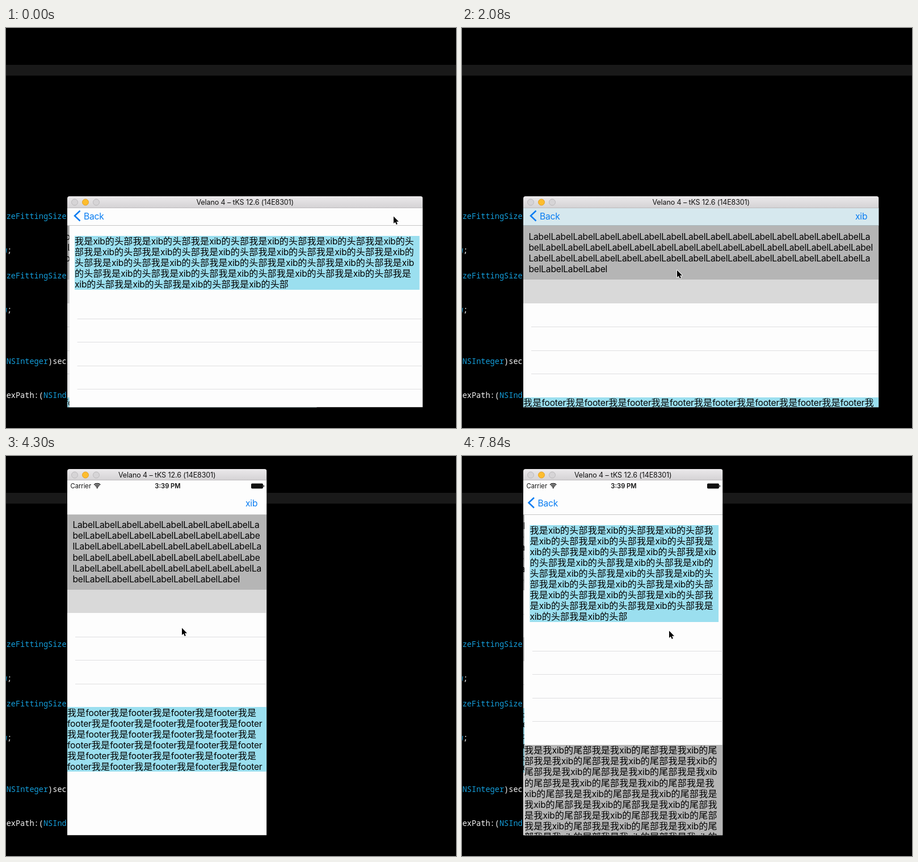
An HTML page with a canvas for the animation above (7990 ms loop, 793x706 px).

```html
<!DOCTYPE html>
<html lang="zh-CN">
<head>
<meta charset="utf-8">
<style>
html, body { margin: 0; width: 100%; height: 100%; overflow: hidden; background: #000; }
canvas { display: block; }
</style>
</head>
<body>
<canvas id="stage" width="793" height="706"></canvas>
<script>
const ctx = document.getElementById('stage').getContext('2d');
const LOOP = 7990, STEP = 148, LAST = 53, TURN = 17;
const LINE = 19.05, ROW = 41.5, PAD = 9.4;
const PAPER = '#fdfdfd', GREY = '#b5b5b5', SKY = '#9bdfef', BLUE = '#087cf2';
const LATIN = 'Inter, sans-serif';
const HAN = '"Noto Sans CJK SC", "Noto Sans CJK JP", "Noto Sans CJK", sans-serif';

// Window box, lower edge of the navigation bar and its items
const wide = { x: 108, y: 297, w: 626.5, h: 372.5, bar: 21, nav: 349, mid: 332, backX: 137, xibX: 693 };
const tall = { x: 108, y: 23, w: 351.5, h: 646.5, bar: 20, nav: 104, mid: 83, backX: 133.5, xibX: 422 };

// Words stay whole, Chinese breaks anywhere
function wrap(unit, width) {
  const out = [''];
  let used = 0;
  for (const part of unit.repeat(27).match(/[a-z]+|./g)) {
    const size = part < '~' ? part.length * 7.2 : 16.15;
    if (used + size > width) {
      out.push('');
      used = 0;
    }
    out[out.length - 1] += part;
    used += size;
  }
  return out;
}

// One endless word is cut at the average letter width
function chop(word, width) {
  const text = word.repeat(50), per = width / 7.84, out = [];
  for (let k = 0; k * per < text.length; k++) {
    out.push(text.slice(Math.floor(k * per), Math.floor((k + 1) * per)));
  }
  return out;
}

for (const lay of [wide, tall]) {
  const inner = lay.w - 2 * PAD;
  lay.label = chop('Label', inner);
  lay.foot = wrap('我是footer', lay.w);
  lay.head = wrap('我是xib的头部', inner);
  lay.tail = wrap('我是我xib的尾部', lay.w);
}

// Pointer stops: step, x, y
const pointer = [
  [0, 683, 332], [6, 570, 490], [11, 150, 333], [14, 379, 427], [21, 379, 427], [22, 392, 423],
  [29, 310, 303], [37, 308, 300], [39, 300, 384], [42, 298, 425], [44, 300, 340], [49, 430, 83], [53, 365, 308]
];
const picks = [0, 1, 3, 4, 2];

const clamp = (v, lo, hi) => Math.min(hi, Math.max(lo, v));
const smooth = (n, from, to) => {
  const p = clamp((n - from) / (to - from), 0, 1);
  return p * p * (3 - 2 * p);
};
const push = k => Math.exp(-1.72 * Math.max(0, k));

function slide(lay, n) {
  return lay.w * (lay === wide ? push(n + 3) + smooth(n, 11, 14) : push(n - 50));
}

function scrolled(lay, n) {
  if (lay === wide) return 122 * smooth(n, 1, 8.25);
  return 70 * Math.sin(Math.PI * clamp((n - 22) / 8, 0, 1)) ** 4;
}

function rect(x, y, w, h, color) {
  const top = Math.round(y);
  ctx.fillStyle = color;
  ctx.fillRect(x, top, w, Math.round(y + h) - top);
}

function disc(x, y, r, color, edge) {
  ctx.beginPath();
  ctx.arc(x, y, r, 0, 7);
  ctx.fillStyle = color;
  ctx.fill();
  ctx.lineWidth = 1;
  ctx.strokeStyle = edge;
  ctx.stroke();
}

function write(str, x, y, font, color, align = 'left', track = 0) {
  ctx.font = font;
  ctx.letterSpacing = track + 'px';
  ctx.textAlign = align;
  ctx.fillStyle = color;
  ctx.fillText(str, x, y);
  return ctx.measureText(str).width;
}

function lines(list, x, y) {
  list.forEach((line, k) => {
    let at = x;
    const base = y + k * LINE + 15.5;
    for (const run of line.match(/[ -~]+|[^ -~]+/g)) {
      at += run < '~'
        ? write(run, at, base, '15.6px ' + LATIN, '#000', 'left', -0.2)
        : write(run, at, base, '16px ' + HAN, '#000', 'left', 0.23);
    }
  });
}

function clipTo(x, y, w, h) {
  ctx.beginPath();
  ctx.rect(x, y, w, h);
  ctx.clip();
}

function rows(lay, x, y, pick) {
  for (let i = 0; i < 5; i++) {
    const end = y + (i + 1) * ROW;
    if (i === pick) rect(x, y + i * ROW, lay.w, ROW, '#d9d9d9');
    else if (i < 4 && i + 1 !== pick) rect(x + 14, end, lay.w - 14, 1, '#dfdfe1');
  }
  return y + 5 * ROW;
}

function codePage(lay, x, scroll, pick) {
  let y = lay.nav - scroll;
  const h = lay.label.length * LINE + 2 * PAD;
  rect(x, lay.nav, lay.w, lay.h, PAPER);
  rect(x, y, lay.w, h, GREY);
  lines(lay.label, x + PAD, y + PAD);
  y = rows(lay, x, y + h, pick);
  rect(x, y, lay.w, lay.foot.length * LINE, SKY);
  lines(lay.foot, x, y);
}

function xibPage(lay, x, scroll) {
  let y = lay.nav + 17.5 - scroll;
  const h = lay.head.length * LINE;
  rect(x, lay.nav, lay.w, lay.h, PAPER);
  rect(x + PAD, y, lay.w - 2 * PAD, h, SKY);
  lines(lay.head, x + PAD, y);
  y = rows(lay, x, y + h + PAD, -1);
  rect(x, y, lay.w, lay.tail.length * LINE, GREY);
  lines(lay.tail, x, y);
  if (scroll > 0) {
    const view = lay.y + lay.h - lay.nav, ratio = view / (view + 122);
    ctx.beginPath();
    ctx.roundRect(x + lay.w - 5, lay.nav + scroll * ratio - 3, 2.5, view * ratio, 1.2);
    ctx.fillStyle = 'rgba(0,0,0,.38)';
    ctx.fill();
  }
}

function navBar(lay, shown, tint, amount) {
  const top = lay.y + lay.bar, base = lay.mid + 5.5, font = '15.6px ' + LATIN;
  rect(lay.x, top, lay.w, lay.nav - top, PAPER);
  ctx.globalAlpha = amount;
  rect(lay.x, top, lay.w, lay.nav - top, tint);
  ctx.globalAlpha = 1;
  rect(lay.x, lay.nav - 1, lay.w, 1, 'rgba(0,0,0,.22)');

  ctx.globalAlpha = shown;
  write('Back', lay.backX, base, font, BLUE, 'left', -0.2);
  const cx = lay.backX - 16, cy = lay.mid - 0.5;
  ctx.beginPath();
  ctx.moveTo(cx + 9.5, cy - 9);
  ctx.lineTo(cx, cy);
  ctx.lineTo(cx + 9.5, cy + 9);
  ctx.strokeStyle = BLUE;
  ctx.lineWidth = 2.5;
  ctx.stroke();
  ctx.globalAlpha = 1 - shown;
  write('xib', lay.xibX, base, font, BLUE, 'left', -0.2);
  ctx.globalAlpha = 1;
}

function statusBar() {
  write('Carrier', 113.5, 57, '11.2px ' + LATIN, '#111');
  write('3:39 PM', 285, 57, '600 11.2px ' + LATIN, '#111', 'center');
  ctx.strokeStyle = '#111';
  ctx.lineWidth = 1.5;
  for (let r = 3.6; r < 9; r += 2.4) {
    ctx.beginPath();
    ctx.arc(160.7, 57, r, -2.3, -0.84);
    ctx.stroke();
  }
  ctx.beginPath();
  ctx.arc(160.7, 56, 1.2, 0, 7);
  ctx.roundRect(432, 48.5, 21, 9, 1.8);
  ctx.roundRect(453.6, 51.2, 1.4, 3.6, 0.6);
  ctx.fillStyle = '#111';
  ctx.fill();
}

function titleBar(lay) {
  const g = ctx.createLinearGradient(0, lay.y, 0, lay.y + lay.bar);
  g.addColorStop(0, '#ebe9eb');
  g.addColorStop(1, '#d4d2d4');
  rect(lay.x, lay.y, lay.w, lay.bar, g);
  rect(lay.x, lay.y + lay.bar - 1, lay.w, 1, '#bdbbbd');
  for (let i = 0; i < 3; i++) {
    const lit = i === 1;
    disc(121 + 19 * i, lay.y + 10.5, 5.5, lit ? '#fdbd2e' : '#d6d4d6', lit ? '#e2a12a' : '#bcbabc');
  }
  write('Velano 4 – tKS 12.6 (14E8301)', lay.x + lay.w / 2, lay.y + 15, '12.5px ' + LATIN, '#111', 'center', -0.1);
}

function phone(lay, n) {
  const land = lay === wide;
  const off = slide(lay, n), scroll = scrolled(lay, n);
  const shown = 1 - off / lay.w;
  const pick = picks[clamp(Math.floor((n - 36) / 2), 0, 4)];
  const body = lay.y + lay.h - lay.nav;

  ctx.save();
  ctx.beginPath();
  ctx.roundRect(lay.x, lay.y, lay.w, lay.h, [4, 4, 0, 0]);
  ctx.clip();
  ctx.save();
  clipTo(lay.x, lay.nav, lay.w, body);
  codePage(lay, lay.x - 0.3 * lay.w * shown, land ? 0 : scroll, pick);
  if (shown > 0) {
    rect(lay.x, lay.nav, lay.w, body, `rgba(0,0,0,${0.1 * shown})`);
    xibPage(lay, lay.x + off, land ? scroll : 0);
  }
  ctx.restore();
  const amount = Math.min(1, scroll / 60) * (land ? shown : 1);
  navBar(lay, shown, land ? '#d6e8ee' : '#e4e4e4', amount);
  if (!land) statusBar();
  titleBar(lay);
  ctx.restore();
}

function editor() {
  const key = '#149edb', plain = '#f4f4f4', pitch = 8.16;
  const code = (x, y, ...parts) => {
    parts.forEach(([str, color]) => {
      write(str, x, y, '500 13.6px "Noto Sans Mono", monospace', color);
      x += str.length * pitch;
    });
  };
  rect(0, 0, 793, 706, '#000');
  rect(0, 65, 793, 18.5, '#191919');
  ctx.save();
  clipTo(0, 84, 108, 622);
  for (const y of [336.5, 442]) {
    code(-7.5, y, ['izeFittingSize', key]);
    code(-6.2, y + 60, ['w', key], [';', plain]);
  }
  code(-7.5, 592.5, ['(', plain], ['NSInteger', key], [')sec', plain]);
  code(-7.5, 652.5, ['dexPath:(', plain], ['NSInd', key]);
  ctx.restore();
}

function arrow(n) {
  const i = Math.max(1, pointer.findIndex(p => p[0] >= n));
  const [from, x0, y0] = pointer[i - 1], [to, x1, y1] = pointer[i];
  const p = smooth(n, from, to);
  const shape = [[0, 0], [0, 14], [3.2, 11], [5.4, 16], [7.6, 15], [5.5, 10.2], [10, 10.2]];
  ctx.save();
  ctx.translate(x0 + (x1 - x0) * p, y0 + (y1 - y0) * p + 0.5);
  ctx.scale(0.9, 0.9);
  ctx.beginPath();
  shape.forEach(([x, y]) => ctx.lineTo(x, y));
  ctx.closePath();
  ctx.lineJoin = 'round';
  ctx.lineWidth = 2;
  ctx.strokeStyle = '#fff';
  ctx.stroke();
  ctx.fillStyle = '#000';
  ctx.fill();
  ctx.restore();
}

function draw(t) {
  const n = Math.min(LAST, Math.floor((t + 6) / STEP));
  editor();
  ctx.save();
  if (n < TURN) phone(wide, n);
  else {
    const tilt = 0.165 * (1 - smooth(n, TURN, TURN + 2));
    if (tilt) {
      clipTo(59, 23, 676, 647);
      ctx.translate(284, 346.5);
      ctx.rotate(tilt);
      ctx.translate(-284, -346.5);
    }
    phone(tall, n);
  }
  ctx.restore();
  arrow(n);
}

let start;
function tick(now) {
  start ??= now;
  draw((now - start) % LOOP);
  requestAnimationFrame(tick);
}
draw(0);
requestAnimationFrame(tick);
</script>
</body>
</html>
```
